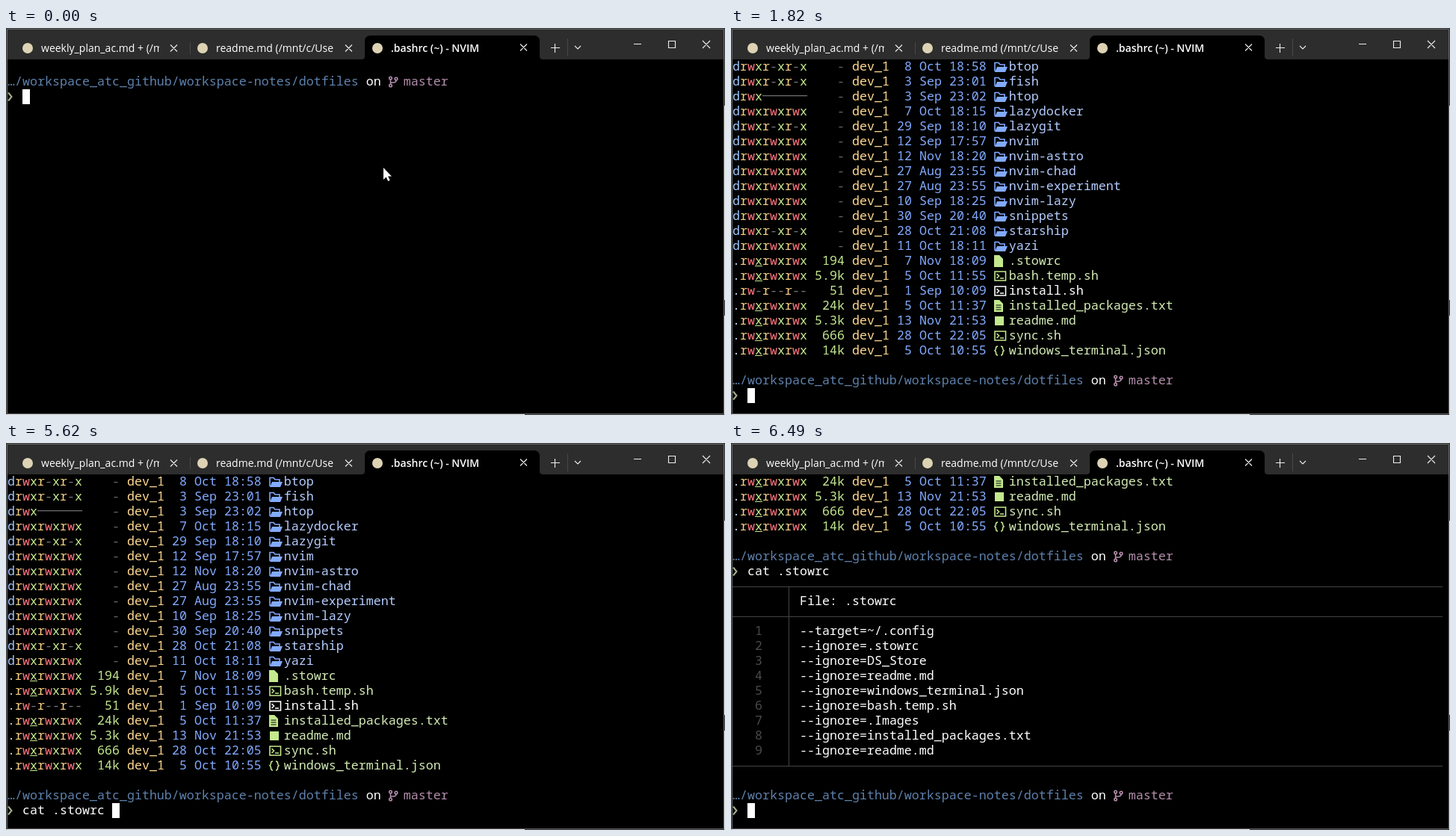
These frames come from a looping animation (962x518 px, 8000 ms). An HTML page:

```html
<!DOCTYPE html>
<html lang="en">
<head>
<meta charset="utf-8">
<title>Terminal session</title>
<style>
html, body { margin: 0; width: 100%; height: 100%; overflow: hidden; background: #333; }
#stage { position: relative; width: 962px; height: 518px; overflow: hidden; }
#chrome, #pointer { position: absolute; left: 0; top: 0; }
#chrome text { font: 500 14px "Open Sans", sans-serif; fill: #fff; }
#chrome .active { font-weight: 600; }
#view { position: absolute; left: 2px; top: 42px; width: 958px; height: 474px; overflow: hidden; background: #000; }
#lines { position: absolute; left: 0; top: 0; width: 958px; }
.line { position: relative; height: 20px; overflow: hidden; }
.text { position: absolute; left: 0; top: -1px; white-space: pre; color: #fff;
  font: 16.6667px/20px "Noto Sans Mono", monospace; font-variant-ligatures: none; }
.line svg { position: absolute; top: 0; }
#cursor { position: absolute; width: 10px; height: 20px; background: #fff; }
.rule { position: absolute; left: 0; top: 10px; width: 950px; height: 1px; background: #444; }
.bar { position: absolute; left: 75px; width: 1px; background: #444; }
</style>
</head>
<body>
<div id="stage">
  <div id="view"><div id="lines"></div><div id="cursor"></div></div>
  <svg id="chrome" width="962" height="518" fill="none" stroke-width="1.1">
    <path d="M2 2H960V42H2z" fill="#2c2d2c"/>
    <path d="M476 42q4 0 4-4V18q0-8 8-8H706q8 0 8 8V38q0 4 4 4z" fill="#000"/>
    <path d="M961.5 104V364M961.5 385V518M0 517.5H694" stroke="#e4e4e4" stroke-width="1"/>
    <path d="M1.5 1.5H960.5V516.5H1.5z" stroke="#6a6a6a" stroke-width="1"/>
    <path d="M246.5 19V35M751.5 14V38" stroke="#484848"/>
    <g fill="#ddd3b4"><circle cx="29" cy="27" r="7"/><circle cx="263" cy="27" r="7"/><circle cx="497" cy="27" r="7"/></g>
    <clipPath id="c1"><path d="M47 10h158v30h-158z"/></clipPath>
    <clipPath id="c2"><path d="M281 10h158v30h-158z"/></clipPath>
    <g clip-path="url(#c1)"><text x="47" y="32">weekly_plan_ac.md + (/mnt</text></g>
    <g clip-path="url(#c2)"><text x="281" y="32">readme.md (/mnt/c/Users</text></g>
    <text class="active" x="515" y="32">.bashrc (~) - NVIM</text>
    <g stroke="#eee">
      <path d="M220 22.500l9 9m0-9l-9 9M454 22.500l9 9m0-9l-9 9M688 21.500l9 9m0-9l-9 9"/>
      <path d="M729 26.500h12M734.500 21v12M761 24l4 4 4-4"/>
      <path d="M840 21.500h10M886.500 17.500h9v9h-9zM932 17l10 10m0-10l-10 10"/>
    </g>
  </svg>
  <svg id="pointer" width="962" height="518"><path d="M505 187v16l3.600-3.400 2.600 5.400 2.500-1.200-2.600-5.200h4.900z" fill="#fff"/></svg>
</div>
<script>
const $ = id => document.getElementById(id);
const LOOP = 8000, ROWS = 23, CELL = 10, ROW = 20;
const BLUE = '#82aaff', GREEN = '#c3e88d', YELLOW = '#ffd890', DIM = '#666';
const PERM = { d: '#a0c6ff', '.': '#d8dcec', r: '#f5cd80', w: '#ff757f', x: GREEN, '-': '#777', '─': '#777' };

const span = (text, color, extra = '') => `<span style="color:${color};${extra}">${text}</span>`;
const row = (text, extra = '') => `<div class="text">${text}</div>${extra}`;
const icon = (col, color, shape) =>
  `<svg style="left:${col * CELL}px" width="20" height="20" fill="none" stroke="${color}" stroke-width="1.6">${shape}</svg>`;
const solid = (d, color) => `<path d="${d}" fill="${color}" stroke="none"/>`;

const page = 'M0 2h7l5 5v11H0z';
const icons = {
  dir: c => '<path d="M1 16V4.500h5l2 2.500h6v3"/>' + solid('M1 17L4 10H18L15 17z', c),
  page: c => solid(page, c),
  text: c => solid(page, c) + '<path d="M2.500 9h7M2.500 12h7M2.500 15h7" stroke="#000" stroke-width="1.2"/>',
  shell: () => '<path d="M1 4h14.500v12H1zM3.500 7l3 3-3 3M8 13h5"/>',
  square: c => solid('M1 4h12v12H1z', c),
  json: () => '<path d="M5 4Q2.500 4 2.500 6.500T.5 10Q2.500 10 2.500 13T5 16M9 4Q11.500 4 11.500 6.500T13.500 10Q11.500 10 11.500 13T9 16"/>'
};

const listing = `
drwxr-xr-x - 8 Oct 18:58 btop dir
drwxr-xr-x - 3 Sep 23:01 fish dir
drwx────── - 3 Sep 23:02 htop dir
drwxrwxrwx - 7 Oct 18:15 lazydocker dir
drwxr-xr-x - 29 Sep 18:10 lazygit dir
drwxrwxrwx - 12 Sep 17:57 nvim dir
drwxrwxrwx - 12 Nov 18:20 nvim-astro dir
drwxrwxrwx - 27 Aug 23:55 nvim-chad dir
drwxrwxrwx - 27 Aug 23:55 nvim-experiment dir
drwxrwxrwx - 10 Sep 18:25 nvim-lazy dir
drwxrwxrwx - 30 Sep 20:40 snippets dir
drwxr-xr-x - 28 Oct 21:08 starship dir
drwxrwxrwx - 11 Oct 18:11 yazi dir
.rwxrwxrwx 194 7 Nov 18:09 .stowrc page
.rwxrwxrwx 5.9k 5 Oct 11:55 bash.temp.sh shell
.rw-r--r-- 51 1 Sep 10:09 install.sh shell
.rwxrwxrwx 24k 5 Oct 11:37 installed_packages.txt text
.rwxrwxrwx 5.3k 13 Nov 21:53 readme.md square
.rwxrwxrwx 666 28 Oct 22:05 sync.sh shell
.rwxrwxrwx 14k 5 Oct 10:55 windows_terminal.json json`.trim().split('\n');

function entry(source) {
  const [perms, size, day, month, time, name, kind] = source.split(' ');
  const isDir = kind === 'dir', plain = !isDir && !perms.includes('x');
  const mode = [...perms].map((c, i) =>
    span(c, PERM[c], !isDir && i === 3 && c === 'x' ? 'text-decoration:underline' : '')).join('');
  const iconColor = plain ? '#fff' : isDir ? BLUE : GREEN;
  const nameColor = plain ? '#fff' : isDir ? '#b4ccff' : '#d3ebb4';
  return row(mode + span(size.padStart(5), isDir ? DIM : GREEN) + span(' dev_1 ', YELLOW) +
    span(`${day.padStart(2)} ${month} ${time}   `, BLUE) + span(name, nameColor),
    icon(35, iconColor, icons[kind](iconColor)));
}

const path = row(span('…/workspace_atc_github/workspace-notes/dotfiles', '#5e81ac') + ' on   ' + span('master', '#b48ead'),
  icon(51, '#b48ead', '<circle cx="2.500" cy="5" r="1.800"/><circle cx="2.500" cy="15" r="1.800"/><circle cx="10" cy="6" r="1.800"/><path d="M2.500 7v6M10 8Q10 11 6 11H2.500"/>'));
const prompt = command => row('  ' + command, icon(0, '#a3b28a', '<path d="M1 4.500L5.500 10 1 15.500" stroke-width="2"/>'));
const bar = (top, height) => `<div class="bar" style="top:${top}px;height:${height}px"></div>`;
const rule = (top, height) => '<div class="rule"></div>' + bar(top, height);

const config = ['--target=~/.config', ...['.stowrc', 'DS_Store', 'readme.md', 'windows_terminal.json',
  'bash.temp.sh', '.Images', 'installed_packages.txt', 'readme.md'].map(name => '--ignore=' + name)];

const lines = [
  '', path, prompt('ll'), ...listing.map(entry),
  '', path, prompt('cat .stowrc '),
  rule(10, 10), row('         File: .stowrc', bar(0, 20)), rule(0, 20),
  ...config.map((text, i) => row(span(`   ${i + 1}     `, '#4a4a4a') + text, bar(0, 20))),
  rule(0, 10), '', path, prompt('')
];
$('lines').innerHTML = lines.map(html => `<div class="line">${html}</div>`).join('');
const nodes = [...$('lines').children];

// [time, cursor line, cursor column, show the whole cursor line]
const states = [
  [0, 2, 2], [910, 2, 3], [1120, 2, 4], [1540, 3, 0], [1630, 14, 0], [1650, 23, 0],
  [1790, 25, 0], [1820, 25, 2], [2740, 25, 3], [3290, 25, 4], [3470, 25, 5], [3680, 25, 6],
  [4700, 25, 7], [5070, 25, 8], [5300, 25, 9], [5620, 25, 14], [6090, 26, 0],
  [6310, 32, 0, true], [6340, 36, 0, true], [6370, 39, 0], [6460, 41, 0], [6490, 41, 2]
];

function draw() {
  const t = performance.now() % LOOP;
  const [, last, col, whole] = states.findLast(s => s[0] <= t);
  const top = Math.max(0, last - ROWS + 1);
  nodes.forEach((node, i) => {
    node.style.visibility = i > last ? 'hidden' : 'visible';
    node.style.width = i === last && !whole ? col * CELL + 'px' : '100%';
  });
  $('lines').style.top = -top * ROW + 'px';
  $('cursor').style.left = col * CELL + 'px';
  $('cursor').style.top = (last - top) * ROW + 'px';
  $('pointer').style.visibility = t < 890 ? 'visible' : 'hidden';
  requestAnimationFrame(draw);
}
draw();
</script>
</body>
</html>
```
